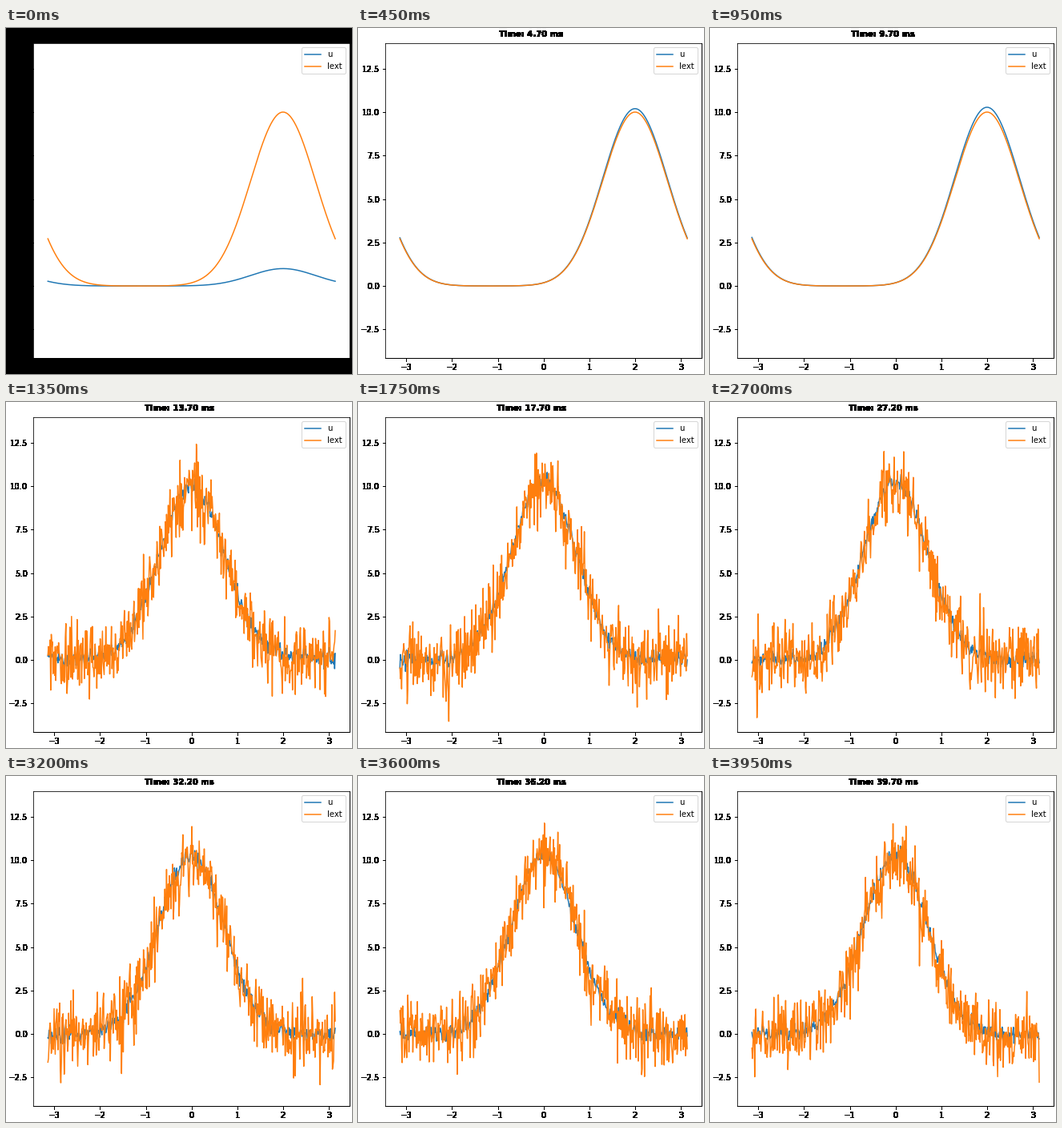
Write a matplotlib script that moves like this. It is 432x432 px and loops after 4000 ms.

```python
import numpy as np
import matplotlib.pyplot as plt
from matplotlib.animation import FuncAnimation
from matplotlib.patches import Rectangle

# Ring attractor network: one bump-shaped input, then a shifted noisy one
N, DT, STEP, FRAMES = 512, 0.1, 5, 80
K, WIDTH, AMP, J0 = 8.1, 0.5, 10.0, 4.0
SWITCH = 100

x = np.linspace(-np.pi, np.pi, N)


def ring(d):
    """Signed distance on the circle."""
    return (d + np.pi) % (2 * np.pi) - np.pi


def stimulus(pos):
    return AMP * np.exp(-0.25 * (ring(x - pos) / WIDTH) ** 2)


def simulate():
    steps = STEP * FRAMES
    rng = np.random.default_rng(12)
    iext = np.empty((steps, N))
    iext[:SWITCH] = stimulus(2.0)
    iext[SWITCH:] = stimulus(0.0)
    iext[SWITCH:] += 0.1 * AMP * rng.standard_normal((steps - SWITCH, N))

    dist = ring(x[:, None] - x[None, :])
    conn = J0 * np.exp(-0.5 * (dist / WIDTH) ** 2) / (np.sqrt(2 * np.pi) * WIDTH)
    u = np.zeros(N)
    us = np.empty_like(iext)
    for i in range(steps):
        r = u**2 / (1 + K * np.sum(u**2))
        u = u + DT * (-u + conn @ r + iext[i])
        us[i] = u
    return us, iext


def solid(img, dpi):
    """Turn every touched pixel fully black, without antialiasing."""
    out = np.zeros_like(img)
    out[..., 3] = img[..., 3] > 0
    return out, 0, 0


us, iext = simulate()

plt.rcParams.update({"font.family": "DejaVu Sans", "font.size": 10})
fig, ax = plt.subplots(figsize=(6, 6), dpi=72, layout="constrained")
line_u, = ax.plot(x, us[0], label="u")
line_i, = ax.plot(x, iext[0], label="Iext")
ax.set_ylim(-4.14, 13.96)
ax.legend(loc="upper right")
title = fig.suptitle("Time: 0.20 ms", fontsize=10, fontweight="bold")
backdrop = fig.add_artist(Rectangle((0, 0), 1, 1, transform=fig.transFigure,
                                    color="black", zorder=-1))

# Settle the layout once, then keep it
fig.draw_without_rendering()
fig.set_layout_engine("none")

# Everything outside the plot area is hard-edged black
outside = [title, ax.spines.right, ax.spines.bottom]
for axis in (ax.xaxis, ax.yaxis):
    outside += [*axis.get_ticklabels(), *axis.get_ticklines()]
for artist in outside:
    artist.set_agg_filter(solid)


def update(frame):
    t = frame * STEP
    line_u.set_ydata(us[t])
    line_i.set_ydata(iext[t])
    title.set_text(f"Time: {(t + 2) * DT:.2f} ms")
    backdrop.set_visible(frame == 0)
    return line_u, line_i, title, backdrop


anim = FuncAnimation(fig, update, frames=FRAMES, interval=50,
                     repeat=True, repeat_delay=0, blit=False)
plt.show()
```
